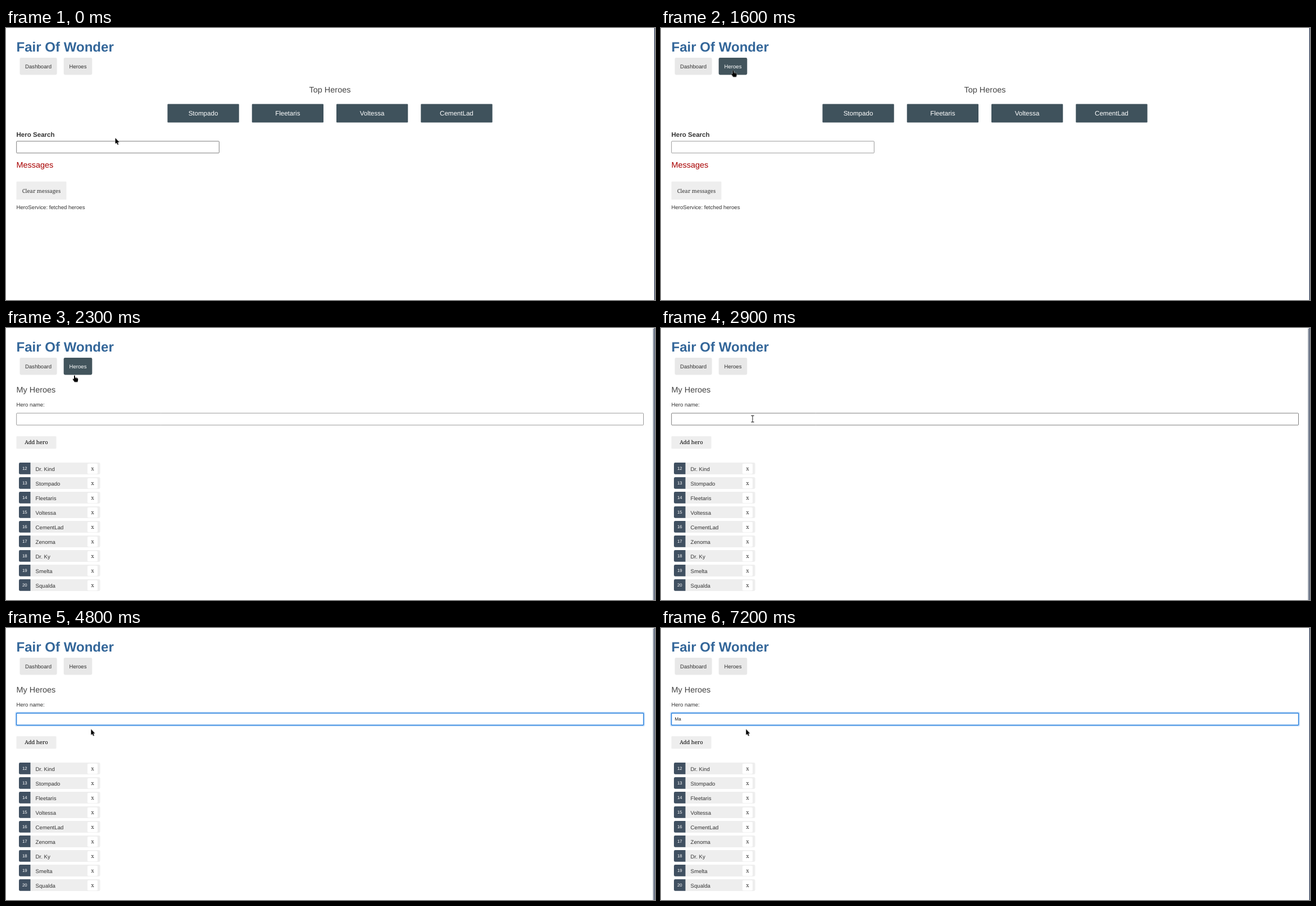
Recreate the animation shown at these times as an HTML page. Size 1155 by 485 pixels, loop 8 s.

```html
<!DOCTYPE html>
<html lang="en">
<head>
<meta charset="utf-8">
<title>Fair Of Wonder</title>
<style>
html, body { margin: 0; width: 100%; height: 100%; overflow: hidden; background: #fff; }
svg { display: block; width: 100%; height: 100%; }
text { font: 9.63px "Liberation Sans", Arial, sans-serif; fill: #333; text-rendering: geometricPrecision; }
.mid { text-anchor: middle; }
.h1 { font-size: 24.06px; font-weight: bold; fill: #369; }
.h2 { font-size: 14.44px; fill: #444; }
.red { fill: #a80000; }
.label { font-size: 11.55px; font-weight: bold; }
.serif { font: 9.48px "Noto Serif", serif; }
.badge { font-size: 7.8px; fill: #fff; }
.typed { font-size: 8.02px; fill: #111; }
.tile { fill: #3f525c; }
.tileText { font-size: 11.55px; fill: #fff; }
.btn { fill: #eee; }
.nav { fill: #e8e8e8; }
.box { fill: #fff; stroke: #999; stroke-width: 1; }
.caret { fill: #444; }

[class*="t-"] { animation: 8s step-end infinite; }

/* 100 ms = 1.25% */
.t-dash { animation-name: dash; }
@keyframes dash { 0% { opacity: 1 } 22.5%, 100% { opacity: 0 } }
.t-heroes { animation-name: heroes; }
@keyframes heroes { 0% { opacity: 0 } 22.5%, 100% { opacity: 1 } }
.t-list { animation-name: list; }
@keyframes list { 0% { opacity: 0 } 28.75%, 100% { opacity: 1 } }
.t-log { animation-name: log; }
@keyframes log {
  0% { transform: none; opacity: 1 }
  22.5% { transform: translateY(18.7px); opacity: 1 }
  28.75%, 100% { transform: translateY(18.7px); opacity: 0 }
}
.t-bar { animation-name: bar; }
@keyframes bar {
  0% { opacity: 0 } 28.75% { opacity: 1 }
  50% { opacity: .8 } 51.25% { opacity: .6 } 52.5% { opacity: .4 } 53.75% { opacity: .2 } 55% { opacity: 1 }
  71.25% { opacity: .8 } 72.5% { opacity: .6 } 73.75% { opacity: .4 } 75% { opacity: .2 } 76.25%, 100% { opacity: 0 }
}
.t-nav1 { animation-name: nav1; }
@keyframes nav1 { 0% { opacity: 0 } 10% { opacity: 1 } 17.5%, 100% { opacity: 0 } }
.t-nav2 { animation-name: nav2; }
@keyframes nav2 { 0% { opacity: 0 } 18.75% { opacity: 1 } 30%, 100% { opacity: 0 } }
.t-search { animation-name: search; }
@keyframes search { 0% { stroke: #7c7c7c } 3.75%, 100% { stroke: #999 } }
.t-name { animation-name: name; }
@keyframes name { 0% { stroke: #999 } 35%, 100% { stroke: #7c7c7c } }
.t-focus { animation-name: focus; }
@keyframes focus { 0% { opacity: 0 } 45%, 100% { opacity: 1 } }
.t-caret0 { animation-name: caret0; }
@keyframes caret0 { 0% { opacity: 0 } 45% { opacity: 1 } 57.5%, 100% { opacity: 0 } }
.t-caret1 { animation-name: caret1; }
@keyframes caret1 { 0% { opacity: 0 } 73.75% { opacity: 1 } 86.25%, 100% { opacity: 0 } }
.t-caret2 { animation-name: caret2; }
@keyframes caret2 { 0% { opacity: 0 } 86.25% { opacity: 1 } 90%, 100% { opacity: 0 } }
.t-key1 { animation-name: key1; }
@keyframes key1 { 0% { opacity: 0 } 73.75%, 100% { opacity: 1 } }
.t-key2 { animation-name: key2; }
@keyframes key2 { 0% { opacity: 0 } 86.25%, 100% { opacity: 1 } }

.t-arrow { animation-name: arrow; }
@keyframes arrow {
  0% { opacity: 1 } 10% { opacity: 0 } 17.5% { opacity: 1 } 18.75% { opacity: 0 }
  30% { opacity: 1 } 35% { opacity: 0 } 58.75%, 100% { opacity: 1 }
}
.t-hand { animation-name: hand; }
@keyframes hand { 0% { opacity: 0 } 10% { opacity: 1 } 17.5% { opacity: 0 } 18.75% { opacity: 1 } 30%, 100% { opacity: 0 } }
.t-beam { animation-name: beam; }
@keyframes beam { 0% { opacity: 0 } 35% { opacity: 1 } 58.75%, 100% { opacity: 0 } }
.t-move { animation-name: move; }
@keyframes move {
  0% { transform: translate(194.5px, 196px) }
  3.75% { transform: translate(187px, 186px) }
  5% { transform: translate(166px, 158px) }
  6.25% { transform: translate(139px, 127px) }
  7.5% { transform: translate(113px, 102px) }
  8.75% { transform: translate(96px, 86px) }
  10% { transform: translate(88px, 76px) }
  11.25% { transform: translate(85.2px, 73.5px) }
  16.25% { transform: translate(89px, 74px) }
  17.5% { transform: translate(98px, 75px) }
  18.75% { transform: translate(118px, 75.5px) }
  20% { transform: translate(128.5px, 75.5px) }
  26.25% { transform: translate(126.2px, 75.2px) }
  28.75% { transform: translate(122px, 84.5px) }
  30% { transform: translate(124px, 92px) }
  31.25% { transform: translate(130px, 104px) }
  32.5% { transform: translate(139px, 121px) }
  33.75% { transform: translate(149px, 138px) }
  35% { transform: translate(158px, 153px) }
  36.25% { transform: translate(163px, 162px) }
  37.5% { transform: translate(165.5px, 165px) }
  55% { transform: translate(162px, 166px) }
  57.5% { transform: translate(158px, 170px) }
  58.75% { transform: translate(153.5px, 175px) }
  60%, 100% { transform: translate(151.3px, 180.3px) }
}
</style>
</head>
<body>
<svg viewBox="0 0 1155 485" preserveAspectRatio="none">
  <text class="h1" x="18.5" y="41.8">Fair Of Wonder</text>
  <g id="nav"></g>

  <g class="t-dash">
    <text class="h2 mid" x="576.5" y="115.1">Top Heroes</text>
    <g id="tiles"></g>
    <text class="label" x="18.5" y="194.1">Hero Search</text>
    <rect class="box t-search" x="18.7" y="201.9" width="360.6" height="21" rx="1"/>
  </g>

  <g class="t-log">
    <text class="h2 red" x="18.5" y="248.6">Messages</text>
    <rect class="btn" x="18.5" y="273.7" width="89" height="32.4" rx="1.2"/>
    <text class="serif mid" x="63" y="293.8">Clear messages</text>
    <text x="18.5" y="322.8">HeroService: fetched heroes</text>
  </g>

  <g class="t-heroes">
    <text class="h2" x="18.5" y="115.1">My Heroes</text>
    <text x="18.5" y="139.6">Hero name:</text>
    <rect class="box t-name" x="18.7" y="151.9" width="1115.8" height="21.2" rx="1"/>
    <rect class="btn" x="18.5" y="193" width="71" height="22.3" rx="1.2"/>
    <text class="serif mid" style="fill:#000" x="54" y="207.4">Add hero</text>
  </g>

  <g class="t-focus" fill="none">
    <rect x="17.1" y="150.3" width="1119" height="24.4" rx="2.2" stroke="#cfe4fa" stroke-width="2"/>
    <rect x="18.6" y="151.8" width="1116" height="21.4" rx="1" fill="#fff" stroke="#1f7bdc" stroke-width="1.4"/>
  </g>
  <text class="typed t-key1" x="24.6" y="165.3">M</text>
  <text class="typed t-key2" x="31.3" y="165.3">a</text>
  <rect class="caret t-caret0" x="24.6" y="157.6" width=".8" height="9.4"/>
  <rect class="caret t-caret1" x="31.3" y="157.6" width=".8" height="9.4"/>
  <rect class="caret t-caret2" x="36" y="157.6" width=".8" height="9.4"/>

  <g id="list" class="t-list"></g>

  <rect x="1153.8" width="1.2" height="485" fill="#1c2a47"/>
  <rect class="t-bar" x="1151.6" y="1" width="1.4" height="484" fill="#5f6b7d"/>

  <g class="t-move">
    <path class="t-arrow" d="M0 0V10.6L2.3 8.5 4 12.3 5.7 11.5 4.1 7.8H7.1Z" stroke="#fff" stroke-width=".8" paint-order="stroke"/>
    <g class="t-hand" stroke="#fff" stroke-width=".8">
      <path d="M-1 .8Q0-.8 1 .8V4Q4 3.7 5.3 4.9Q6.7 5.6 6.2 8.3L5.4 11.7H0L-3.2 7.3Q-3.2 5.4-1.7 6.2L-1 7Z" paint-order="stroke"/>
      <path d="M2.2 4.4V6M4 4.8V6.3" stroke-width=".4"/>
    </g>
    <g class="t-beam" fill="none">
      <path id="ibeam" d="M-2.6-5.6H2.6M0-5.6V5.6M-2.6 5.6H2.6" stroke="#fff" stroke-width="2"/>
      <use href="#ibeam" style="stroke:#333"/>
      <path d="M-2.6-5.6H2.6M0-5.6V5.6M-2.6 5.6H2.6" stroke="#333" stroke-width="1.1"/>
    </g>
  </g>
</svg>
<script>
const fill = (id, items, draw) => {
  document.getElementById(id).innerHTML = items.map(draw).join("");
};
const rect = (cls, x, y, w, h, r) =>
  `<rect class="${cls}" x="${x}" y="${y}" width="${w}" height="${h}" rx="${r}"/>`;
const text = (cls, x, y, s) => `<text class="${cls}" x="${x}" y="${y}">${s}</text>`;

const names = ["Dr. Kind", "Stompado", "Fleetaris", "Voltessa", "CementLad", "Zenoma", "Dr. Ky", "Smelta", "Squalda"];

fill("nav", [["Dashboard", 24.5, 66.2], ["Heroes", 102.7, 50.6]], ([s, x, w], i) => {
  const mid = x + w / 2;
  return rect("nav", x, 53, w, 30.5, 2.4) + text("mid", mid, 71.9, s) +
    `<g class="t-nav${i + 1}">${rect("", x, 53, w, 30.5, 2.4).replace("<rect", '<rect fill="#42545c"')}` +
    `<text class="mid" style="fill:#fff" x="${mid}" y="71.9">${s}</text></g>`;
});

fill("tiles", names.slice(1, 5), (s, i) => {
  const x = 287.4 + i * 150.3;
  return rect("tile", x, 135.5, 127.3, 33, 1.2) + text("tileText mid", x + 63.6, 156.1, s);
});

fill("list", names, (s, i) => {
  const y = 240 + i * 26;
  return rect("btn", 23, y, 144.6, 21, 2.4) +
    `<path fill="#405061" d="M43.5 ${y}v20.8H25.4a2.4 2.4 0 0 1-2.4-2.4V${y + 2.4}a2.4 2.4 0 0 1 2.4-2.4z"/>` +
    text("badge mid", 33.3, y + 13, 12 + i) +
    text("", 52.6, y + 15.2, s) +
    `<g fill="#fff">${rect("", 145, y + 1.8, 18, 18.4, 2)}</g>` +
    text("serif mid", 154, y + 14.2, "x");
});
</script>
</body>
</html>
```
